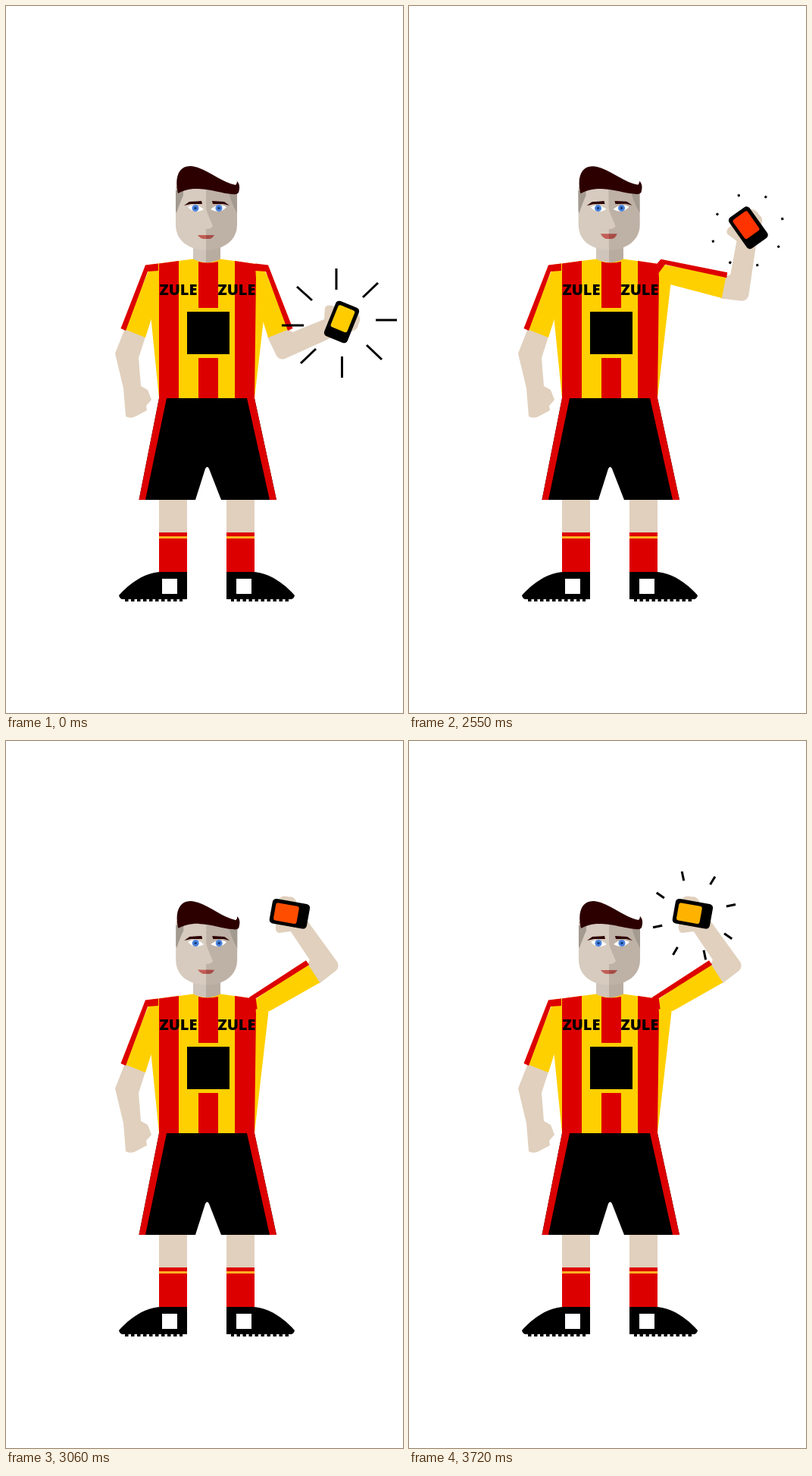
Animation, 524 px wide and 932 px high, one loop 3750 ms. Source, as an HTML page:

```html
<!DOCTYPE html>
<html lang="en">
<head>
<meta charset="utf-8">
<title>Player raising a phone</title>
<style>
  html, body { margin: 0; width: 100%; height: 100%; overflow: hidden; background: #fff; }
  svg { display: block; width: 100vw; height: 100vh; }
  text { font: 800 20px "Open Sans", "Noto Sans", sans-serif; text-anchor: middle; }
  .red { fill: #d00; }
  .yellow { fill: #ffd000; }
  .skin { fill: #e0d0bd; }
  .dark { fill: #2d0000; }
</style>
</head>
<body>
<svg viewBox="0 0 524 932">
  <defs>
    <g id="sleeve">
      <path class="yellow" d="M323 347H341L374 426L346 437L323 365Z"/>
      <path class="red" d="M329 339.500L346 341.500L378.500 425L372 428L343 350L329 349Z"/>
    </g>
    <g id="leg">
      <path class="skin" d="M202 650h37v45h-37z"/>
      <path class="red" d="M202 694h37v53h-37z"/>
      <path fill="#ffb020" d="M202 699h37v3h-37z"/>
      <path d="M149 777C166 758 186 746 206 746H239V782H153Q150 781 149 777Z"/>
      <path d="M157 783.500H233" stroke="#000" stroke-width="3" stroke-dasharray="4.500 3.500"/>
      <path fill="#fff" d="M206 755h20v20h-20z"/>
    </g>
  </defs>

  <use href="#leg"/>
  <use href="#leg" transform="matrix(-1 0 0 1 530 0)"/>

  <path d="M202 517H328L357 651H284L268 610Q265.500 605 263 610L250 651H175.500Z"/>
  <path class="red" d="M202 517H212L184 651H175.500ZM318 517H328L357 651H348Z"/>

  <g id="head">
    <path fill="#d0c5ba" d="M247 300H265V339H247Z"/>
    <path fill="#b8aca0" d="M264 300H283V339H264Z"/>
    <path fill="#d6cbbe" d="M224 238H265V322C240 321 224 309 224 288Z"/>
    <path fill="#beb1a5" d="M264 238H305V288C305 309 288 321 264 322Z"/>
    <path fill="#d6cbbe" d="M261 245C262 270 268 277 273 290Q271 294 264 294H259Z"/>
    <path fill="#a39a90" d="M224 243H234V250Q230 258 225 273L224 270ZM305 243H295V250Q299 263 305 273Z"/>
    <path class="dark" d="M227 247C222 226 228 211 243 211C263 212 282 232 303 236Q305 234 305 231Q310 236 307 246Q305 249 299 248C283 247 269 240 247 241Q236 242 227 247Z"/>
    <path class="dark" d="M235 263L242 258L258 257L259 261L244 261ZM295 263L288 258L272 257L273 261L287 261Z"/>
    <path fill="#fff" d="M240 265Q250 259 261 268Q249 275 240 265ZM291 265Q281 259 270 268Q282 275 291 265Z"/>
    <g fill="#4b84dc"><circle cx="250" cy="266.500" r="4.500"/><circle cx="281" cy="266.500" r="4.500"/></g>
    <g fill="#173c80"><circle cx="250" cy="266.500" r="1.800"/><circle cx="281" cy="266.500" r="1.800"/></g>
    <g id="mouth">
      <path fill="#c25e57" d="M253 302H265V307H260Q256 306 253 302Z"/>
      <path fill="#a84c47" d="M264 302H275Q272 307 268 307H264Z"/>
    </g>
  </g>

  <path class="yellow" d="M190 341L247 333.500Q265 343 283 333.500L329 340L338 346L346.500 357L328 517H202L186 358L190 345Z"/>

  <path class="skin" d="M157 425L144 458L155 504L158 541Q165 545 173 540L186 533L185 527L192 519L187 506L178 501L175 464L184 436Z"/>
  <use href="#sleeve" transform="matrix(-1 0 0 1 530 0)"/>

  <g id="arm">
    <path class="skin" d="M345 436L357 461Q361 467 368 465L428 438L455 429Q465 427 465 420Q469 413 466 408L460 398L434 396Q423 392 421 398L420 413L378 430L372 425Z"/>
    <use href="#sleeve"/>
    <g transform="translate(443 416.500) rotate(22)">
      <rect x="-16.500" y="-25" width="33" height="50" rx="5"/>
      <rect id="screen" x="-12" y="-20" width="23.500" height="31" rx="3"/>
    </g>
    <path id="rays" fill="none" stroke="#000" stroke-width="3"/>
  </g>

  <!-- stripes cover the inner ends of both sleeves -->
  <path class="red" d="M202 339.500L228 336V517H202ZM254 337Q265 340 280 337V398H254ZM254 464H280V517H254ZM302 336L329 340L330 360L328 517H302Z"/>
  <path d="M239 403h56v56h-56z"/>
  <text x="227.500" y="381">ZULE</text>
  <text x="304.500" y="381">ZULE</text>
</svg>
<script>
const LOOP = 3750, STEP = 30, START = 2250;
const $ = id => document.getElementById(id);

// inner x, inner y, outer x, outer y
const RAYS = [
  [436, 374, 436, 346], [471, 384, 491, 365], [488, 414, 516, 414], [476, 447, 496, 466],
  [443.5, 462, 443.5, 490], [409, 452, 389, 471], [393, 421, 364, 421], [404, 388, 384, 370]
];
const HEAD = [[0, 0], [180, -0.6], [420, -0.2], [570, 0.4], [1050, 0]];
const MOUTH = [[0, 1], [180, 1.35], [420, 1.35], [570, 1.15], [1050, 1]];

const clamp = v => Math.min(1, Math.max(0, v));

// 1 at the start of each period, 0 halfway
const triangle = (t, period) => Math.abs(1 - 2 * (t % period) / period);

function track(keys, t) {
  const i = keys.findIndex(k => k[0] > t);
  if (i < 0) return keys[keys.length - 1][1];
  const [t0, a] = keys[i - 1], [t1, b] = keys[i];
  return a + (b - a) * (t - t0) / (t1 - t0);
}

const bezier = (a, b, s) => 3 * (1 - s) ** 2 * s * a + 3 * (1 - s) * s * s * b + s ** 3;

function ease(u) {
  if (u <= 0 || u >= 1) return clamp(u);
  let lo = 0, hi = 1;
  for (let i = 0; i < 20; i++) {
    const mid = (lo + hi) / 2;
    if (bezier(0.25, 0.7, mid) < u) lo = mid; else hi = mid;
  }
  return bezier(0.22, 1, lo);
}

function draw(time) {
  const t = Math.max(0, Math.floor(time / STEP) * STEP - START);
  const angle = -101.8 * ease((t - 25) / 590);
  const reach = triangle(t, 540);
  const green = Math.round(204 * triangle(t, 480));

  $("arm").setAttribute("transform", `rotate(${angle} 332 350)`);
  $("screen").setAttribute("fill", `rgb(255,${green},0)`);
  $("rays").setAttribute("d", RAYS.map(([x, y, ox, oy]) =>
    `M${x} ${y}L${x + (ox - x) * reach} ${y + (oy - y) * reach}`).join(""));
  $("head").setAttribute("transform", `rotate(${track(HEAD, t)} 265 330)`);
  $("mouth").setAttribute("transform", `translate(0 307) scale(1 ${track(MOUTH, t)}) translate(0 -307)`);
}

const begin = performance.now();
function loop() {
  draw((performance.now() - begin) % LOOP);
  requestAnimationFrame(loop);
}
loop();
</script>
</body>
</html>
```
